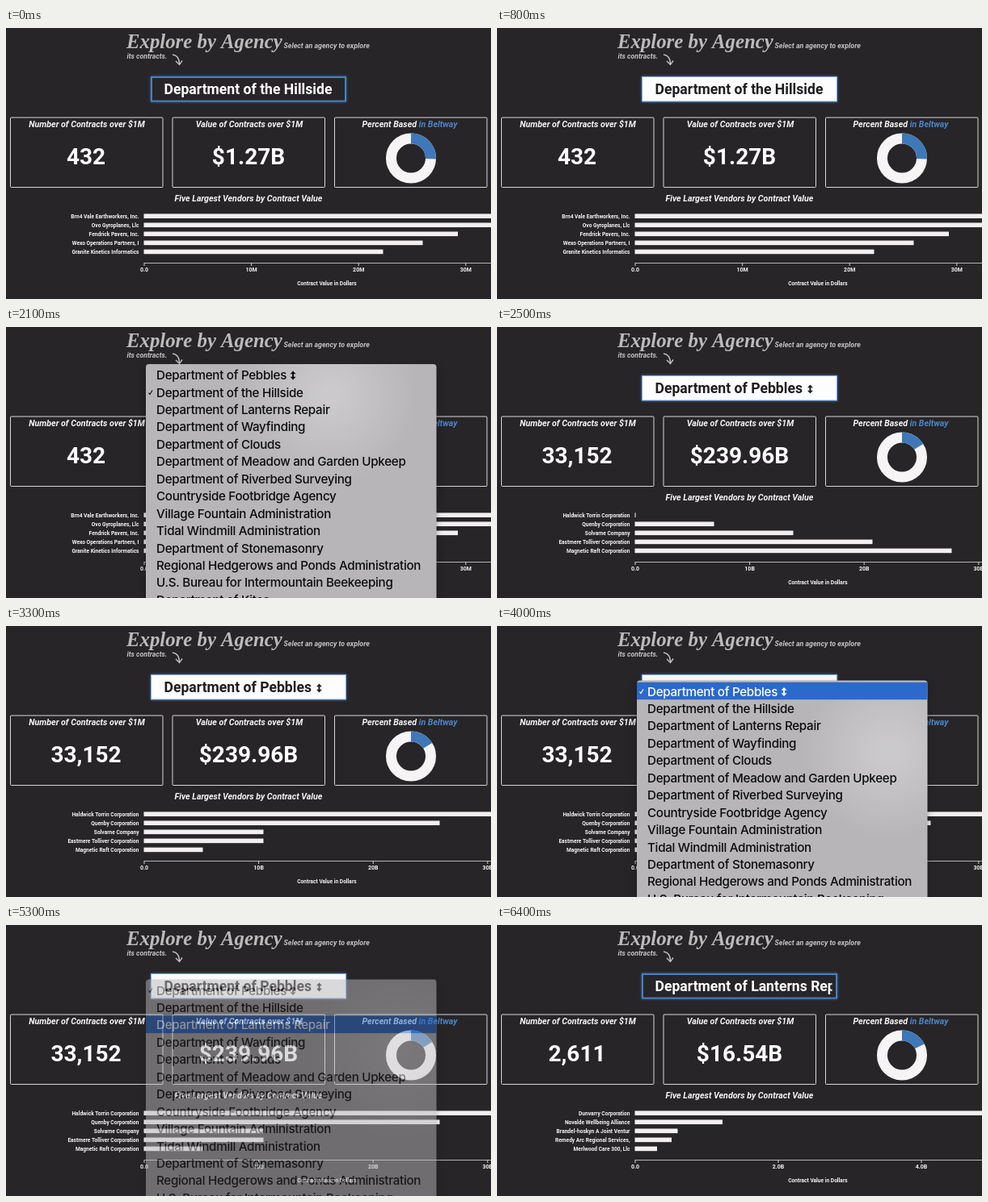
An HTML page with a canvas for the animation above (6.5 s loop, 600x336 px).

```html
<!DOCTYPE html>
<html lang="en">
<head>
<meta charset="utf-8">
<title>Explore by Agency</title>
<style>
  html, body { margin: 0; width: 600px; height: 336px; overflow: hidden; background: #272527; }
  canvas { position: absolute; left: 0; top: 0; }
</style>
</head>
<body>
<canvas id="page" width="600" height="336"></canvas>
<canvas id="menu" width="600" height="336"></canvas>
<script>
const LOOP = 6500, STEP = 100;
const WHITE = '#f6f4f5', BLUE = '#3f78b8', DARK = '#272527';
const page = document.getElementById('page').getContext('2d');
const menuCanvas = document.getElementById('menu');
const menu = menuCanvas.getContext('2d');

const OPTIONS = [
  'Department of Pebbles', 'Department of the Hillside', 'Department of Lanterns Repair',
  'Department of Wayfinding', 'Department of Clouds', 'Department of Meadow and Garden Upkeep',
  'Department of Riverbed Surveying', 'Countryside Footbridge Agency',
  'Village Fountain Administration', 'Tidal Windmill Administration',
  'Department of Stonemasonry', 'Regional Hedgerows and Ponds Administration',
  'U.S. Bureau for Intermountain Beekeeping', 'Department of Kites'
];

// bars are lengths in pixels; ticks are spaced evenly from the axis start
const AGENCIES = [
  { start: 0, option: 1, count: '432', value: '$1.27B', share: 0.255,
    vendors: ['Brn4 Vale Earthworkers, Inc.', 'Ovo Gyroplanes, Llc', 'Fendrick Pavers, Inc.',
              'Wexo Operations Partners, I', 'Granite Kinetics Informatics'],
    bars: [470, 440, 388.5, 345, 296], tickGap: 132.6, ticks: ['0.0', '10M', '20M', '30M'] },
  { start: 2500, option: 0, count: '33,152', value: '$239.96B', share: 0.16,
    vendors: ['Haldwick Torrin Corporation', 'Quenby Corporation', 'Solvarne Company',
              'Eastmere Tolliver Corporation', 'Magnetic Raft Corporation'],
    bars: [520, 366, 148, 148, 73], tickGap: 141.6, ticks: ['0.0', '10B', '20B', '30B'] },
  { start: 5500, option: 2, count: '2,611', value: '$16.54B', share: 0.175,
    vendors: ['Dunvarry Corporation', 'Novalde Wellbeing Alliance', 'Brandel-hoskyn A Joint Ventur',
              'Remedy Arc Regional Services,', 'Merlwood Care 300, Llc'],
    bars: [460, 108.5, 53, 45.5, 27.5], tickGap: 177, ticks: ['0.0', '2.0B', '4.0B'] }
];

// hover: [time, highlighted row], -1 for the blink before closing
// glow: centre of the bright patch that shines through the panel
const MENUS = [
  { open: 1100, fade: 2200, checked: 1, glow: [400, 85],
    hover: [[1100, 1], [1700, 0], [2100, -1], [2200, 0]] },
  { open: 3800, fade: 5200, checked: 0, glow: [485, 155],
    hover: [[3800, 0], [4500, 1], [4700, 2], [5100, -1], [5200, 2]] }
];
const FADE_TIME = 200, BAR_TIME = 500;

const roboto = (style, size) => `${style} ${size}px Roboto, sans-serif`;
const LABEL = roboto('700', 6.6), CAPTION = roboto('italic 600', 10.65);

function text(ctx, str, x, y, font, color = WHITE, align = 'left') {
  ctx.font = font;
  ctx.fillStyle = color;
  ctx.textAlign = align;
  ctx.fillText(str, x, y);
}

function line(ctx, color, width, ...points) {
  ctx.strokeStyle = color;
  ctx.lineWidth = width;
  ctx.beginPath();
  points.forEach(([x, y]) => ctx.lineTo(x, y));
  ctx.stroke();
}

function upDownArrow(ctx, x, y, color) {
  ctx.fillStyle = color;
  for (const dir of [-1, 1]) {
    ctx.beginPath();
    ctx.moveTo(x - 3.5, y + dir * 1.8);
    ctx.lineTo(x + 3.5, y + dir * 1.8);
    ctx.lineTo(x, y + dir * 5.5);
    ctx.fill();
  }
  ctx.fillRect(x - 1, y - 2, 2, 4);
}

function drawHeader() {
  const grey = '#c4c1c2';
  text(page, 'Explore by Agency', 149, 25, 'italic 700 24.8px "Liberation Serif", serif', '#bcbabb');
  text(page, 'Select an agency to explore', 343.5, 25, roboto('italic 600', 8.85), grey);
  text(page, 'its contracts.', 149.5, 38, roboto('italic 600', 8.7), grey);
  page.strokeStyle = grey;
  page.lineWidth = 1.4;
  page.beginPath();
  page.moveTo(206, 33);
  page.quadraticCurveTo(214.5, 34, 214.5, 45);
  page.stroke();
  line(page, grey, 1.4, [210, 41], [214.5, 45.5], [218, 40.5]);
}

function drawSelect(option, hovered) {
  const ink = hovered ? '#1f1d1f' : '#ffffff';
  page.save();
  page.shadowColor = '#4a86d0';
  page.shadowBlur = 3;
  page.strokeStyle = hovered ? '#7fa6de' : '#4a7fc0';
  page.lineWidth = 2;
  page.strokeRect(180, 61, 240, 29.5);
  page.restore();
  page.fillStyle = hovered ? '#fdfdfe' : DARK;
  const inset = hovered ? 0 : 1;
  page.fillRect(180 + inset, 61 + inset, 240 - 2 * inset, 29.5 - 2 * inset);
  page.save();
  page.beginPath();
  page.rect(181, 62, 233.5, 27.5);
  page.clip();
  text(page, OPTIONS[option], 195.5, 82, roboto('600', 17.6), ink);
  if (option === 0) upDownArrow(page, 205 + page.measureText(OPTIONS[0]).width, 77, ink);
  page.restore();
}

function drawCards({ count, value, share }) {
  page.strokeStyle = '#d8d6d7';
  page.lineWidth = 1;
  for (const x of [5.5, 206, 406.5]) {
    page.beginPath();
    page.roundRect(x, 111, 188.5, 86.5, 1);
    page.stroke();
  }
  text(page, 'Number of Contracts over $1M', 100, 123, CAPTION, WHITE, 'center');
  text(page, 'Value of Contracts over $1M', 301, 123, CAPTION, WHITE, 'center');
  text(page, 'Percent Based ', 440.5, 123, CAPTION);
  text(page, 'in Beltway', 440.5 + page.measureText('Percent Based ').width, 123, CAPTION, '#4a86c8');
  text(page, count, 99, 168.5, roboto('700', 28), '#fff', 'center');
  text(page, value, 300, 168.5, roboto('700', 28), '#fff', 'center');

  const top = -Math.PI / 2;
  page.lineWidth = 13;
  for (const [color, part] of [[WHITE, 1], [BLUE, share]]) {
    page.strokeStyle = color;
    page.beginPath();
    page.arc(501, 161.5, 24.5, top, top + part * 2 * Math.PI);
    page.stroke();
  }
}

function drawChart({ start, vendors, bars, tickGap, ticks }, t) {
  const left = 171;
  const progress = start ? Math.min(1, (t - start) / BAR_TIME) : 1;
  const eased = 1 - (1 - progress) ** 3;
  text(page, 'Five Largest Vendors by Contract Value', 300, 214.5, CAPTION, WHITE, 'center');
  vendors.forEach((name, i) => {
    const y = 233.2 + i * 11.05;
    const ramp = i * 98;
    text(page, name, 164.5, y + 2.3, LABEL, WHITE, 'right');
    page.fillStyle = '#f3eff1';
    page.fillRect(left - 0.5, y - 2.8, Math.max(1, ramp + (bars[i] - ramp) * eased), 5.6);
  });
  line(page, '#b5b3b4', 1, [left, 291.5], [600, 291.5]);
  ticks.forEach((label, i) => {
    const x = left + i * tickGap;
    line(page, '#d0cecf', 1, [x, 291], [x, 295]);
    text(page, label, x, 302, roboto('700', 7), WHITE, 'center');
  });
  text(page, 'Contract Value in Dollars', 397, 319.3, LABEL, WHITE, 'center');
}

function drawMenu({ checked, hover, glow }, t) {
  const left = 173, width = 359.5, pitch = 21.45, ink = '#0c0c0c';
  const firstRow = 81 - checked * pitch;
  const top = firstRow - 13.5;
  const active = hover.filter(([time]) => time <= t).pop()[1];

  menu.save();
  menu.shadowColor = 'rgba(0,0,0,.35)';
  menu.shadowBlur = 8;
  menu.shadowOffsetY = 4;
  menu.fillStyle = '#b7b5b8';
  menu.beginPath();
  menu.roundRect(left, top, width, 340, 4);
  menu.fill();
  menu.restore();
  const shine = menu.createRadialGradient(...glow, 10, ...glow, 110);
  shine.addColorStop(0, 'rgba(255,255,255,.28)');
  shine.addColorStop(1, 'rgba(255,255,255,0)');
  menu.fillStyle = shine;
  menu.fill();

  OPTIONS.forEach((name, i) => {
    const y = firstRow + i * pitch;
    const color = i === active ? '#fff' : ink;
    if (i === active) {
      menu.fillStyle = '#2b69cb';
      menu.fillRect(left, y - pitch / 2 - 0.5, width, pitch);
    }
    menu.letterSpacing = '-0.3px';
    text(menu, name, 186, y + 5.5, '500 15.2px Inter, sans-serif', color);
    if (i === 0) upDownArrow(menu, 194 + menu.measureText(name).width, y + 0.5, color);
    if (i === checked) line(menu, color, 1.1, [176.5, y + 0.5], [178, y + 2.5], [181, y - 2.5]);
  });
}

function draw(t) {
  const agency = AGENCIES.filter(a => a.start <= t).pop();
  const openMenu = MENUS.find(m => t >= m.open && t < m.fade + FADE_TIME);

  page.fillStyle = DARK;
  page.fillRect(0, 0, 600, 336);
  drawHeader();
  drawSelect(agency.option, t >= 500 && t < 6000);
  drawCards(agency);
  drawChart(agency, t);

  menu.clearRect(0, 0, 600, 336);
  if (openMenu) {
    menuCanvas.style.opacity = Math.min(1, 1 - (t - openMenu.fade) / FADE_TIME);
    drawMenu(openMenu, t);
  }
}

function tick() {
  draw(Math.floor(performance.now() % LOOP / STEP) * STEP);
  requestAnimationFrame(tick);
}
tick();
</script>
</body>
</html>
```
